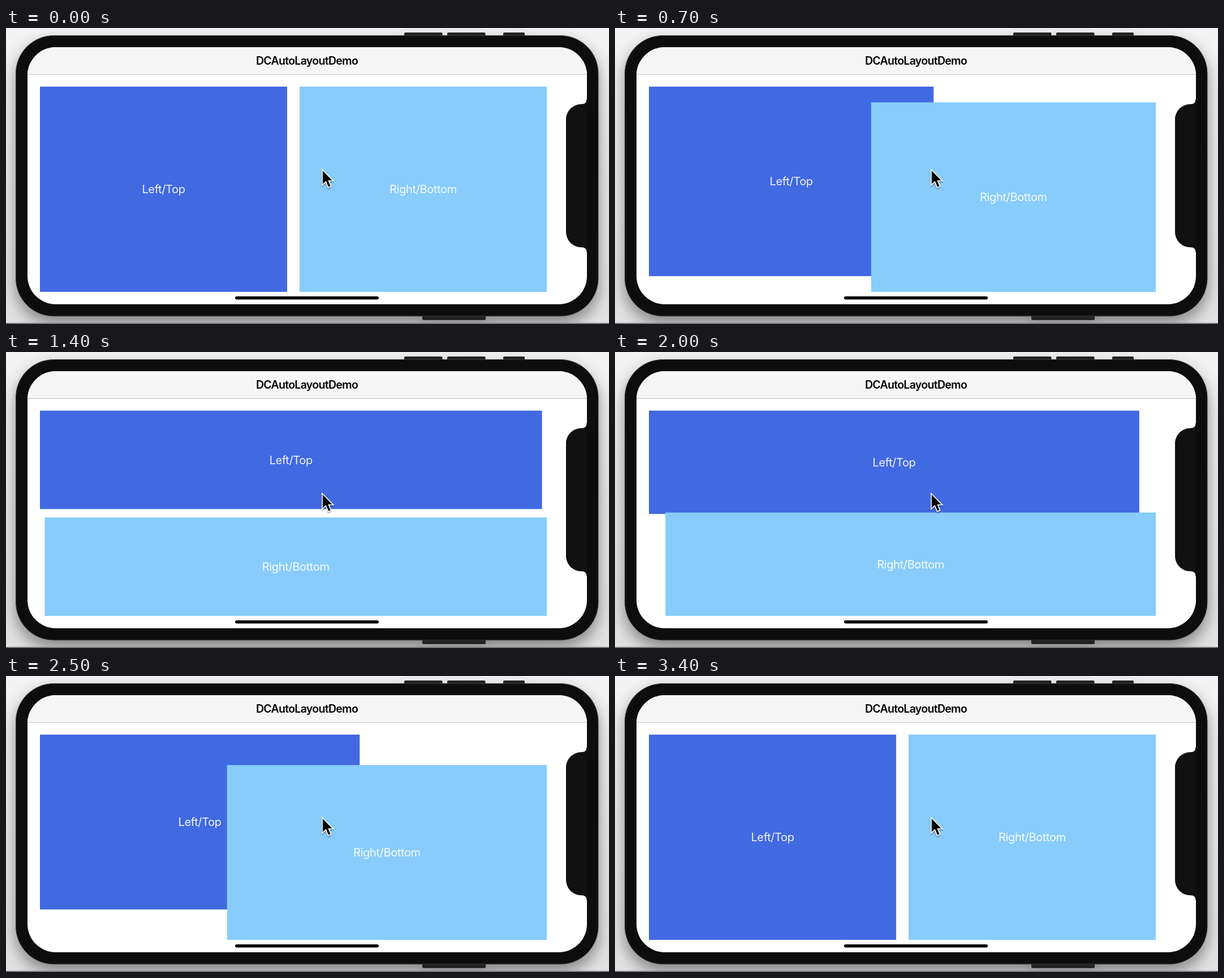
An HTML page that plays this animation: 1066 by 525 pixels, repeating every 3.5 s.

```html
<!DOCTYPE html>
<html lang="en">
<head>
<meta charset="utf-8">
<title>Auto layout demo</title>
<style>
  html, body { margin: 0; width: 100%; height: 100%; overflow: hidden; background: #eee; }
  svg { display: block; width: 1066px; height: 525px; }
  text { font-family: Inter, "Liberation Sans", sans-serif; text-anchor: middle; }
  .title { font-size: 19.5px; font-weight: 600; letter-spacing: -.7px; }
  .pane text { font-size: 20px; letter-spacing: -.35px; fill: #fff; fill-opacity: .93; }
</style>
</head>
<body>
<svg viewBox="0 0 1066 525">
  <defs>
    <linearGradient id="wall" x2="0" y2="1">
      <stop stop-color="#f3f3f3"/>
      <stop offset="1" stop-color="#e2e2e2"/>
    </linearGradient>
    <filter id="cast" x="-10%" y="-10%" width="120%" height="125%">
      <feDropShadow dx="0" dy="13" stdDeviation="14" flood-opacity=".42"/>
    </filter>
    <filter id="soft" x="-50%" y="-50%" width="200%" height="200%">
      <feDropShadow dx="0" dy="2" stdDeviation="1.3" flood-opacity=".4"/>
    </filter>
    <clipPath id="screen"><rect x="38" y="34" width="989" height="456" rx="50"/></clipPath>
  </defs>

  <rect width="1066" height="525" fill="url(#wall)"/>
  <g filter="url(#cast)">
    <g fill="#222">
      <rect x="704" y="8" width="67.5" height="10" rx="2"/>
      <rect x="780" y="8" width="67.5" height="10" rx="2"/>
      <rect x="879" y="8" width="38" height="10" rx="2"/>
      <rect x="736" y="507" width="112" height="11" rx="2"/>
    </g>
    <rect x="17.5" y="13.5" width="1029.5" height="497.5" rx="67" fill="#111" stroke="#383838"/>
  </g>
  <rect y="523" width="1066" height="2" fill="#777"/>

  <g clip-path="url(#screen)">
    <rect x="38" y="34" width="989" height="456" fill="#fff"/>
    <rect x="38" y="34" width="989" height="48" fill="#f6f6f6"/>
    <rect x="38" y="82" width="989" height="1" fill="#bcbcbc"/>
    <text class="title" x="532" y="65">DCAutoLayoutDemo</text>
    <g class="pane" id="left"><rect fill="#4169e1"/><text>Left/Top</text></g>
    <g class="pane" id="right"><rect fill="#87ccfa"/><text>Right/Bottom</text></g>
    <rect x="405" y="476" width="254" height="5.5" rx="2.75"/>
    <path d="M1028 126H1026.500Q1026.500 135 1018 135C1002 135 990 147 990 163V361C990 377 1002 389 1018 389Q1026.500 389 1026.500 398H1028Z" fill="#111"/>
  </g>
  <path d="M559 251V278.500L565.300 272.700 569.700 283 574.800 280.800 570.400 271H578.500Z"
        stroke="#fff" stroke-width="1.6" filter="url(#soft)"/>
</svg>
<script>
const LOOP = 3500, STEP = 100, DURATION = 1095;
const FORTH = 411, BACK = 1806;
const AREA = { x: 60, y: 104, w: 896, h: 364 }, GAP = 22;
const [left, right] = ['left', 'right'].map(id => {
  const g = document.getElementById(id);
  return { rect: g.querySelector('rect'), text: g.querySelector('text') };
});

// Cubic ease-in-out with control points (.42, 0) and (.58, 1)
function ease(x) {
  if (x <= 0) return 0;
  if (x >= 1) return 1;
  let lo = 0, hi = 1;
  for (let i = 0; i < 24; i++) {
    const s = (lo + hi) / 2, r = 1 - s;
    if (3 * .42 * r * r * s + 3 * .58 * r * s * s + s * s * s < x) lo = s;
    else hi = s;
  }
  return lo * lo * (3 - 2 * lo);
}

function setAttrs(el, attrs) {
  for (const key in attrs) el.setAttribute(key, attrs[key]);
}

function place(pane, x, y, width, height) {
  setAttrs(pane.rect, { x, y, width, height });
  setAttrs(pane.text, { x: x + width / 2, y: y + height / 2 + 7.3 });
}

// Side by side at p = 0, stacked at p = 1
function draw(now) {
  const t = Math.floor((now + 5) % LOOP / STEP) * STEP;
  const p = ease((t - FORTH) / DURATION) - ease((t - BACK) / DURATION);
  const w = AREA.w - (AREA.w + GAP) / 2 * (1 - p);
  const h = AREA.h - (AREA.h + GAP) / 2 * p;
  place(left, AREA.x, AREA.y, w, h);
  place(right, AREA.x + AREA.w - w, AREA.y + AREA.h - h, w, h);
}

let start;
function tick(now) {
  start ??= now;
  draw(now - start);
  requestAnimationFrame(tick);
}
draw(0);
requestAnimationFrame(tick);
</script>
</body>
</html>
```
